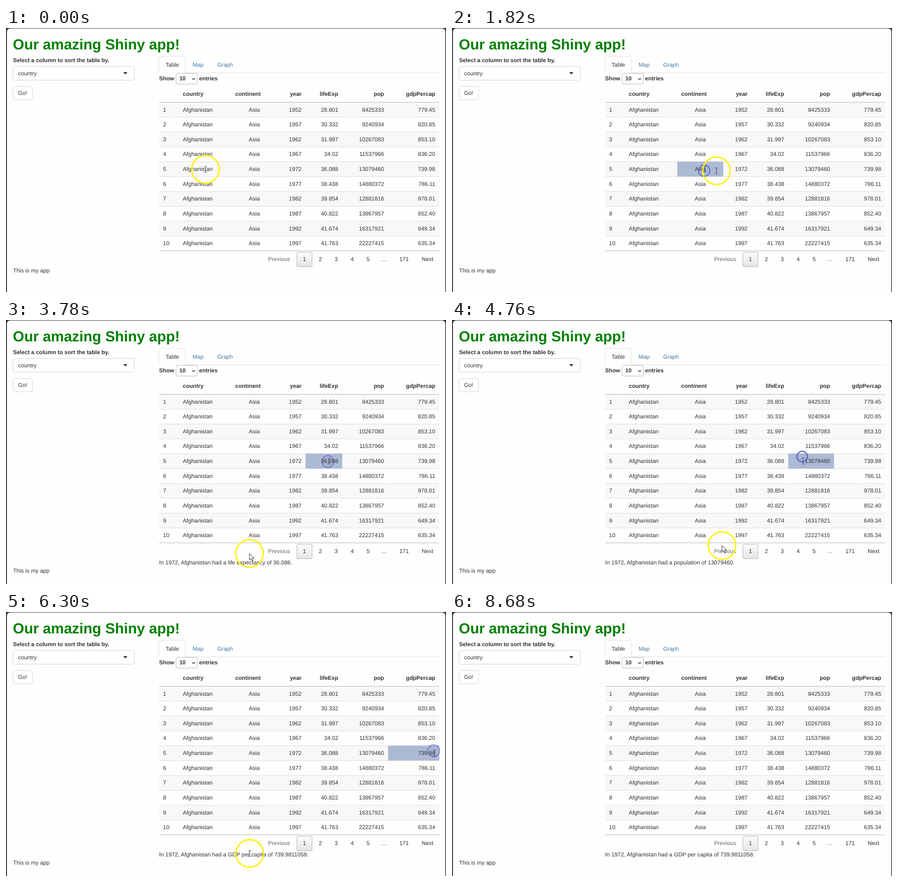
An HTML page for the animation above (8.76 s loop, 965 by 580 pixels).

```html
<!DOCTYPE html>
<html lang="en">
<head>
<meta charset="utf-8">
<title>Shiny app table</title>
<style>
  html, body { margin: 0; width: 100%; height: 100%; overflow: hidden; background: #333; }
  svg { display: block; width: 965px; height: 580px; }
  text {
    font: 12.4px "Liberation Sans", Arial, sans-serif;
    fill: #333;
    text-rendering: geometricPrecision;
  }
  .bold { font-weight: bold; }
  .title { font-size: 32px; font-weight: bold; fill: #008000; }
  .link { fill: #3d7aa3; }
  .muted { fill: #666; }
  .mid { text-anchor: middle; }
  .end { text-anchor: end; }
  .box { fill: #fff; stroke: #ccc; stroke-width: .9; }
  .stripe { fill: #f8f8f8; }
  .rule { stroke: #d9d9d9; stroke-width: .9; }
  .edge { stroke: #b0b0b0; stroke-width: 1; }
  #mark { fill: #acbad4; }
  .beam { fill: none; stroke: #333; stroke-width: 1; }
</style>
</head>
<body>
<svg viewBox="0 0 965 580">
  <defs>
    <linearGradient id="shade" x2="0" y2="1">
      <stop offset="0" stop-color="#fbfbfb"/>
      <stop offset="1" stop-color="#e5e5e5"/>
    </linearGradient>
    <path id="beam" class="beam" d="M-3-6.5h2l1 1l1-1h2M0-5.5v11M-3 6.5h2l1-1l1 1h2"/>
  </defs>
  <rect width="965" height="580" fill="#333"/>
  <path d="M2 580V8a7 7 0 0 1 7-7H956.5a7 7 0 0 1 7 7V580z" fill="#fefefe"/>

  <text class="title" x="15" y="47.2">Our amazing Shiny app!</text>
  <text class="bold" x="15.4" y="75.2">Select a column to sort the table by.</text>
  <rect class="box" x="15.5" y="84.5" width="266" height="30" rx="3.5"/>
  <text x="26.6" y="103.8">country</text>
  <path d="M257 97h9.4l-4.7 5z" fill="#333"/>
  <rect class="box" x="15.5" y="128.5" width="42.6" height="29.2" rx="3.5"/>
  <text x="26.6" y="147">Go!</text>
  <text id="foot" x="15.5">This is my app</text>

  <path d="M335.5 98.5V66a3.5 3.5 0 0 1 3.5-3.5H390a3.5 3.5 0 0 1 3.5 3.5V98.5H950" fill="none" stroke="#ddd" stroke-width=".9"/>
  <text class="mid" x="364.7" y="85">Table</text>
  <text class="link" x="409.2" y="85">Map</text>
  <text class="link" x="463.2" y="85">Graph</text>

  <text class="bold" x="335.8" y="115.4">Show</text>
  <rect class="box" x="373" y="99.7" width="46.7" height="23.4" rx="2.7" style="stroke:#aaa"/>
  <text class="bold" x="380.2" y="115.4">10</text>
  <path d="M408.2 110.2l3.3 3.3l3.3-3.3" fill="none" stroke="#333" stroke-width="1.5"/>
  <text class="bold" x="423.5" y="115.4">entries</text>

  <g id="stripes"></g>
  <rect id="mark" y="293.5" height="32.9"/>
  <g id="cells">
    <text>lifeExp 28.801 30.332 31.997 34.02 36.088 38.438 39.854 40.822 41.674 41.763</text>
    <text>pop 8425333 9240934 10267083 11537966 13079460 14880372 12881816 13867957 16317921 22227415</text>
    <text>gdpPercap 779.45 820.85 853.10 836.20 739.98 786.11 978.01 852.40 649.34 635.34</text>
  </g>

  <rect x="638" y="492.7" width="33.2" height="31.6" rx="2" fill="url(#shade)" stroke="#b0b0b0"/>
  <g id="pager">
    <text class="mid muted" x="598.8" y="512.4">Previous</text>
    <text class="mid" x="873" y="512.4">171</text>
    <text class="mid" x="924.5" y="512.4">Next</text>
  </g>
  <text id="info" x="335.8" y="537.3"></text>

  <g id="ghost">
    <use id="ghostBeam" href="#beam"/>
    <circle id="click" fill="#5566c0" fill-opacity=".1" stroke="#3f50b5" stroke-width="2.4"/>
  </g>
  <g id="pointer">
    <circle id="halo" r="30.2" fill="none" stroke="#fbf20e" stroke-width="3"/>
    <use id="text" href="#beam"/>
    <path id="arrow" d="M0 0V14.2L3.3 11.2L5.6 16.4L7.9 15.4L5.7 10.4H10z" fill="#fff" stroke="#222"/>
  </g>
</svg>
<script>
const LOOP = 8760, STEP = 140, REPLY = 280, FADE = 840;
const TOP = 163.3, ROW = 32.63, PAD = 8.8;
const LEFT = 335.8, EDGES = [379, 494, 595, 657, 737.4, 838, 950.2];
const $ = id => document.getElementById(id);

function add(parent, tag, attrs, content = '') {
  const el = document.createElementNS('http://www.w3.org/2000/svg', tag);
  for (const key in attrs) el.setAttribute(key, attrs[key]);
  el.textContent = content;
  $(parent).append(el);
}
const label = (parent, x, y, content, cls = '') =>
  add(parent, 'text', { x, y, class: cls }, content);

// One column: a bold heading, then a value per row
function column(x, [name, ...values], cls = '', nameX = x) {
  const headCls = nameX === x ? cls : '';
  if (name) label('cells', nameX, 149.3, name, 'bold ' + headCls);
  values.forEach((v, i) => label('cells', x, TOP + 20.3 + i * ROW, v, cls));
}
const fill = (name, rule) => [name, ...Array.from({ length: 10 }, (_, i) => rule(i))];

const numeric = [...$('cells').children].map(el => el.textContent.split(' '));
$('cells').replaceChildren();
column(LEFT + PAD, fill('', i => i + 1));
column(EDGES[0] + PAD, fill('country', () => 'Afghanistan'));
column((EDGES[1] + EDGES[2]) / 2, fill('continent', () => 'Asia'), 'mid', EDGES[1] + PAD);
[fill('year', i => 1952 + 5 * i), ...numeric].forEach((col, i) =>
  column(EDGES[i + 3] - PAD, col, 'end'));

for (let i = 0; i <= 10; i++) {
  const y = TOP + i * ROW, outer = i % 10 === 0;
  if (i < 10 && i % 2 === 0)
    add('stripes', 'rect', { x: LEFT, y, width: EDGES[6] - LEFT, height: ROW, class: 'stripe' });
  add('stripes', 'line', { x1: LEFT, x2: EDGES[6], y1: y, y2: y, class: outer ? 'edge' : 'rule' });
}
[...'12345…'].forEach((s, i) => label('pager', 654.5 + 34.9 * i, 512.4, s, 'mid'));

// The pointer rests one step either side of t; a stop with col is a click on that column
const stops = [
  { t: 280, x: 437.5, y: 310.5, col: 0 },
  { t: 1260, x: 553, y: 313.5, col: 1 },
  { t: 2520, x: 622, y: 314, col: 2 },
  { t: 3080, x: 706, y: 311, col: 3, says: 'life expectancy of 36.088.' },
  { t: 3920, x: 534, y: 513 },
  { t: 4480, x: 768, y: 300, col: 4, says: 'population of 13079460.' },
  { t: 4900, x: 592, y: 495.6 },
  { t: 5600, x: 938, y: 305, col: 5, says: 'GDP per capita of 739.9811058.' },
  { t: 6300, x: 534.5, y: 530.5 },
  { t: 7280, x: 926, y: 309, col: -1 },
  { t: 8540, x: 760, y: 640 }
];
const clicks = stops.filter(s => 'col' in s);

function pointAt(t) {
  const i = stops.findLastIndex(s => s.t - STEP <= t);
  const a = stops[Math.max(i, 0)], b = stops[i + 1] || a;
  const span = b.t - a.t - 2 * STEP;
  const u = span > 0 ? Math.max(0, (t - a.t - STEP) / span) : 0;
  const e = u * u * (3 - 2 * u);
  return [a.x + (b.x - a.x) * e, a.y + (b.y - a.y) * e];
}
const show = (id, on) => $(id).setAttribute('visibility', on ? 'visible' : 'hidden');
const move = (id, x, y) => $(id).setAttribute('transform', `translate(${x} ${y})`);

function draw(now) {
  const t = Math.floor(now % LOOP / STEP) * STEP;
  const [x, y] = pointAt(t);
  const last = clicks.findLast(c => c.t <= t);
  const age = last ? t - last.t : Infinity;

  const marked = last && last.col >= 0;
  show('mark', marked);
  if (marked) {
    $('mark').setAttribute('x', EDGES[last.col]);
    $('mark').setAttribute('width', EDGES[last.col + 1] - EDGES[last.col]);
  }

  const reply = clicks.findLast(c => c.says && c.t + REPLY <= t);
  $('info').textContent = reply ? 'In 1972, Afghanistan had a ' + reply.says : '';
  $('foot').setAttribute('y', reply ? 555 : 537.3);

  const onText = y < 490 || (y > 525 && y < 541);
  move('pointer', x, y);
  show('halo', age >= STEP);
  show('text', onText);
  show('arrow', !onText);

  const fresh = age < FADE;
  show('click', fresh);
  show('ghostBeam', fresh && age >= REPLY);
  if (fresh) {
    move('ghost', last.x, last.y);
    move('ghostBeam', 2, 310 - last.y);
    $('click').setAttribute('r', 10.8 + 2.2 * age / 700);
    $('click').setAttribute('opacity', 1 - age / 1500);
  }
}

const start = performance.now();
function tick() {
  draw(performance.now() - start);
  requestAnimationFrame(tick);
}
tick();
</script>
</body>
</html>
```
